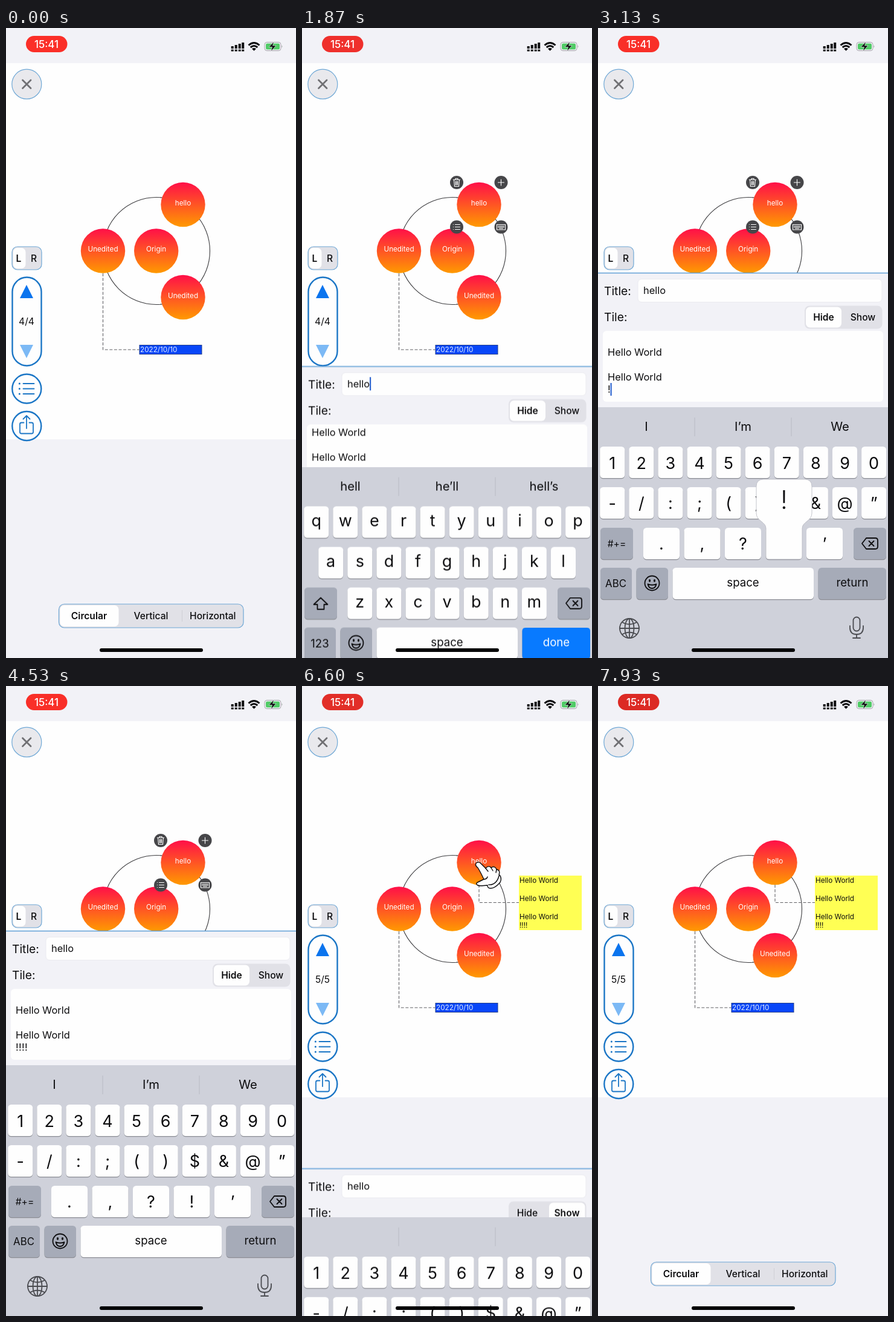
An HTML page that plays this animation: 480 px wide and 1040 px high, repeating every 8 s.

```html
<!DOCTYPE html>
<html lang="en">
<head>
<meta charset="utf-8">
<title>Circular tree editor</title>
<style>
html, body { margin: 0; width: 100%; height: 100%; overflow: hidden; background: #f2f2f7; }
svg { display: block; width: 100vw; height: 100vh; font-family: Inter, Roboto, sans-serif; }
text { fill: #0c0c0e; font-size: 15.6px; }
.mid { text-anchor: middle; }
.med { font-weight: 500; }
.bold { font-weight: 600; }
.small { font-size: 11.7px; }
.node { font-size: 11.7px; fill: #fff; text-anchor: middle; }
.body { font-size: 16.4px; }
.head { font-size: 19.3px; }
.hint { font-size: 20.2px; text-anchor: middle; }
.wide { font-size: 18.6px; text-anchor: middle; }
.key { font-size: 27px; text-anchor: middle; }
.base { fill: #f2f2f7; }
.white { fill: #fefefe; }
.track { fill: #e1e1e7; }
.edge { stroke: #6fa8d6; stroke-width: 1.2; }
.ring { fill: #fefefe; stroke: #1b76c6; stroke-width: 2.4; }
.line { fill: none; stroke: #1b76c6; stroke-width: 1.8; stroke-linecap: round; stroke-linejoin: round; }
.icon { fill: none; stroke: #0c0c0e; stroke-width: 1.8; stroke-linecap: round; stroke-linejoin: round; }
.soft { fill: none; stroke: #4a4b50; stroke-width: 1.8; stroke-linecap: round; }
.dash { fill: none; stroke: #626266; stroke-width: 1.1; stroke-dasharray: 5 2.6; }
.tool circle { fill: #464649; }
.tool path { fill: none; stroke: #fff; stroke-width: 1.1; stroke-linecap: round; }
.caret { fill: #2f66d0; }
.move { animation: 8s infinite; }
#panel { --drop: 648px; animation-name: slide; }
#board { --drop: 414px; animation-name: slide; }
#pill { animation-name: pulse; }
#lines { animation-name: scroll; }
#hand { animation-name: point; }
@keyframes slide {
  0%, 21.425% { transform: translateY(var(--drop)); animation-timing-function: cubic-bezier(.38,.7,.125,1); }
  27.675%, 80.975% { transform: none; animation-timing-function: cubic-bezier(.38,.7,.125,1); }
  87.225%, 100% { transform: translateY(var(--drop)); }
}
@keyframes pulse {
  0% { fill: #fb2f28; } 27% { fill: #ef302c; } 39%, 57% { fill: #f92f28; } 82% { fill: #e22e28; } 100% { fill: #dc2a24; }
}
@keyframes scroll {
  0%, 32.5% { transform: none; }
  34%, 100% { transform: translateY(-19px); }
}
@keyframes point {
  0%, 10.5% { transform: translate(287px, 291px); }
  15.5% { transform: translate(328px, 324px); }
  40% { transform: translate(328px, 324px); animation-timing-function: steps(1); }
  60% { transform: translate(438px, 478px); animation-timing-function: steps(1); }
  75%, 100% { transform: translate(287px, 291px); }
}
</style>
</head>
<body>
<svg viewBox="0 0 480 1040" preserveAspectRatio="none">
  <defs>
    <linearGradient id="fire" x2="0" y2="1">
      <stop stop-color="#ff0f48"/><stop offset="1" stop-color="#ff9a00"/>
    </linearGradient>
    <clipPath id="view"><rect x="8" y="501" width="464" height="116" rx="6"/></clipPath>
  </defs>

  <rect class="base" width="480" height="1040"/>
  <rect class="white" y="58" width="480" height="621"/>

  <!-- status bar -->
  <rect id="pill" class="move" x="33" y="13" width="68.5" height="27" rx="13.5"/>
  <text class="mid med" x="67" y="33" style="fill:#fff;font-size:17px">15:41</text>
  <path d="M374.7 30v4M380.7 28v6M386.7 26v8M392.2 24v10M374.7 35.5v3M380.7 35.5v3M386.7 35.5v3M392.2 35.5v3" stroke="#0c0c0e" stroke-width="4"/>
  <g fill="none" stroke="#0c0c0e" stroke-width="3">
    <path d="M401.5 28.5q9-8 18 0M404.7 32q5.8-5 11.6 0"/>
  </g>
  <path d="M407 34.3q3.5-2.6 7 0l-3.5 3.5z" fill="#0c0c0e"/>
  <rect x="428" y="23.5" width="27" height="14" rx="4" fill="none" stroke="#a2a2a6"/>
  <rect x="430" y="25.5" width="23" height="10" rx="2.5" fill="#50cb66"/>
  <path d="M456.5 28.5q2 2 0 4z" fill="#a2a2a6"/>
  <path d="M443.5 22.5l-8.5 9h5.5l-2 7 8.5-9.5h-5.5z" fill="#0c0c0e" stroke="#f2f2f7" stroke-width=".6"/>

  <!-- tree -->
  <circle cx="249" cy="368" r="88.5" fill="none" stroke="#3c3c3f" stroke-width="1.1"/>
  <path class="dash" d="M160.5 405v126h60"/>
  <rect x="221" y="523.5" width="103" height="15" fill="#0846f8" stroke="#24408c"/>
  <text class="small" x="222" y="535.3" style="fill:#e6eeff">2022/10/10</text>
  <g data-on="5300-8000">
    <path class="dash" d="M293 328v29.5h66"/>
    <rect x="359" y="313" width="104" height="90" fill="#ffff54"/>
    <text class="small" x="360" y="325">Hello World</text>
    <text class="small" x="360" y="355">Hello World</text>
    <text class="small" x="360" y="384.5">Hello World</text>
    <text class="small" x="360" y="399.3">!!!!</text>
  </g>
  <g id="nodes"></g>
  <g class="tool" data-on="700-6450">
    <circle cx="256" cy="255" r="11"/><circle cx="329.5" cy="255" r="11"/>
    <circle cx="256" cy="328.5" r="11"/><circle cx="329.5" cy="328.5" r="11"/>
    <path d="M250.5 250.5h11M254 250.5v-2h4v2M251.5 250.5l1 11h7l1-11M254.3 253v6M256 253v6M257.7 253v6"/>
    <path d="M324.5 255h10M329.5 250v10"/>
    <path d="M250.5 324.5h.1M250.5 328.5h.1M250.5 332.5h.1M253.5 324.5h8M253.5 328.5h8M253.5 332.5h8"/>
    <path d="M322.5 324.5h14v8.5h-14zM324.5 327h10M324.5 329h10M326.5 331h6"/>
  </g>

  <!-- side controls -->
  <circle class="edge" cx="34.3" cy="92.7" r="24.5" fill="#e9e9ed"/>
  <path d="M27.5 86l13.5 13.5M41 86l-13.5 13.5" stroke="#707074" stroke-width="2.8" stroke-linecap="round"/>
  <rect class="track edge" x="10" y="361" width="49" height="38" rx="9"/>
  <rect class="white" x="12" y="363" width="20.5" height="34" rx="7"/>
  <text class="mid bold" x="21" y="385.7">L</text>
  <text class="mid med" x="46" y="385.7">R</text>
  <rect class="ring" x="10.5" y="411.5" width="48" height="146" rx="24"/>
  <path d="M34 424l11 22h-22z" fill="#0b74ee"/>
  <path d="M34 545l11-22h-22z" fill="#7cb9f5"/>
  <text class="mid" x="34" y="490.3" data-on="0-5300">4/4</text>
  <text class="mid" x="34" y="490.3" data-on="5300-8000">5/5</text>
  <circle class="ring" cx="34.3" cy="595.5" r="24"/>
  <path class="line" d="M28.5 587h18M28.5 595.5h18M28.5 604h18"/>
  <path class="line" d="M22.3 587h.1M22.3 595.5h.1M22.3 604h.1" style="stroke-width:3"/>
  <circle class="ring" cx="34.3" cy="657" r="24"/>
  <path class="line" d="M29.5 651.5h-4q-2.5 0-2.5 2.5v13q0 2.5 2.5 2.5h17q2.5 0 2.5-2.5v-13q0-2.5-2.5-2.5h-4M34 661v-20.5M28.5 645.5l5.5-5.5 5.5 5.5"/>

  <!-- layout switch -->
  <rect class="track edge" x="87.5" y="951" width="305.5" height="39" rx="9"/>
  <rect class="white" x="89.5" y="953" width="97" height="35" rx="7"/>
  <path d="M291.5 961v19" stroke="#cfcfd6"/>
  <text class="mid bold" x="137.5" y="975.8">Circular</text>
  <text class="mid med" x="240" y="975.8">Vertical</text>
  <text class="mid med" x="342.3" y="975.8">Horizontal</text>

  <g id="panel" class="move">
    <rect class="base" y="404" width="480" height="660"/>
    <path d="M0 404.5h480" stroke="#5f9fd6" stroke-width="1.3"/>
    <text class="head" x="10" y="440.5">Title:</text>
    <rect class="white" x="66" y="414.5" width="404" height="38" rx="6" stroke="#ebebf0"/>
    <text class="body" x="75" y="439">hello</text>
    <rect class="caret" x="112" y="422" width="2.2" height="22" data-on="1700-2400"/>
    <text class="head" x="10" y="484">Tile:</text>
    <rect class="track" x="342" y="458.5" width="128.5" height="38" rx="8"/>
    <g data-on="0-5300">
      <rect class="white" x="344" y="460.5" width="59" height="34" rx="7"/>
      <text class="mid bold" x="373.5" y="483">Hide</text>
      <text class="mid med" x="438.5" y="483">Show</text>
    </g>
    <g data-on="5300-8000">
      <rect class="white" x="409" y="460.5" width="59.5" height="34" rx="7"/>
      <text class="mid med" x="373" y="483">Hide</text>
      <text class="mid bold" x="438.5" y="483">Show</text>
    </g>
    <rect class="white" x="8" y="500" width="464" height="117" rx="6"/>
    <g clip-path="url(#view)">
      <g id="lines" class="move">
        <text class="body" x="16" y="519">Hello World</text>
        <text class="body" x="16" y="560">Hello World</text>
        <text class="body" x="16" y="601">Hello World</text>
        <rect class="caret" x="107.5" y="584" width="2.2" height="21" data-on="2400-2600"/>
      </g>
    </g>
  </g>

  <g id="board" class="move">
    <rect y="626" width="480" height="434" fill="#cfd1da"/>
    <path d="M160 643v31M320 643v31" stroke="#b8bac4"/>
    <g data-on="0-2620">
      <text class="hint" x="80" y="665">hell</text><text class="hint" x="240" y="665">he’ll</text><text class="hint" x="400.5" y="665">hell’s</text>
    </g>
    <g data-on="2620-6560">
      <text class="hint" x="80" y="665">I</text><text class="hint" x="240" y="665">I’m</text><text class="hint" x="400.5" y="665">We</text>
    </g>
    <g id="common"></g>
    <g id="letters" data-on="0-2850"></g>
    <g id="numbers" data-on="2850-8000"></g>
    <path class="icon" d="M437 851l7-9h15q4 0 4 4v10q0 4-4 4h-15zM448.5 847l8 8M456.5 847l-8 8"/>
    <circle class="icon" cx="89.5" cy="916.5" r="12"/>
    <path class="icon" d="M82.5 918q7 3 14 0q-1.5 7-7 7t-7-7z"/>
    <path class="icon" d="M85.5 911.5v1.5M93.5 911.5v1.5" style="stroke-width:3"/>
    <g class="soft">
      <circle cx="52" cy="991" r="16"/><ellipse cx="52" cy="991" rx="7.5" ry="16"/>
      <path d="M52 975v32M36 991h32M40 981q12 7 24 0M40 1001q12-7 24 0"/>
      <rect x="422.5" y="972.5" width="11" height="23" rx="5.5"/>
      <path d="M417 987v3q0 11 11 11t11-11v-3M428 1001v6M422 1007h12"/>
    </g>
    <g id="popup">
      <path class="white" d="M274 745h68q12 0 12 12v44c0 13-16 14-16 25v46q0 5-5 5h-50q-5 0-5-5v-46c0-11-16-12-16-25v-44q0-12 12-12z" stroke="#b6b8c0" stroke-width=".8"/>
      <text class="mid" x="308" y="794" style="font-size:42px;font-weight:300">!</text>
    </g>
  </g>

  <rect x="155" y="1024" width="171" height="6" rx="3" fill="#050506"/>

  <g id="hand" class="move" stroke="#0c0c0e" stroke-width="1.4" stroke-linejoin="round" stroke-linecap="round">
    <g data-on="430-1660 5000-5560 6250-7000">
      <path class="white" d="M1 2C3-2 8 0 10 3L17 10C20 6 24 6 26 9C30 6 34 8 35 12C39 12 41 16 39 20C43 24 43 29 41 33C36 39 30 43 25 43C22 43 20 41 20 38C14 38 8 40 4 38C0 36 2 33 6 32L14 28C12 24 9 17 4 9C1 7 0 4 1 2z"/>
      <path fill="none" d="M22 37c8 1 15-5 17-15M17 10l4 5M26 9l3 5M35 12l-1 5M14 28q5 0 6-4"/>
    </g>
  </g>
</svg>

<script>
const LOOP = 8000;
const $ = id => document.getElementById(id);
const put = (id, html) => $(id).insertAdjacentHTML('beforeend', html);

const node = (x, y, name) =>
  `<circle cx="${x}" cy="${y}" r="36.7" fill="url(#fire)"/><text class="node" x="${x}" y="${y + 1.4}">${name}</text>`;
put('nodes', node(293, 291.5, 'hello') + node(160.5, 368, 'Unedited') +
  node(248.7, 368, 'Origin') + node(293, 444.5, 'Unedited'));

// Keyboard
const WHITE = '#fefefe', GRAY = '#a6abb8', BLUE = '#087aff';
const cap = (x, y, w, fill = WHITE) =>
  `<rect x="${x}" y="${y + 1.3}" width="${w}" height="52" rx="5.5" fill="#8b8d94"/>` +
  `<rect x="${x}" y="${y}" width="${w}" height="52" rx="5.5" fill="${fill}"/>`;
const label = (x, y, s, cls = 'key', style = '') => `<text class="${cls}" x="${x}" y="${y}" style="${style}">${s}</text>`;
const row = (chars, x, y, base, step = 48.1, w = 41) => [...chars].map((c, i) =>
  cap(x + step * i - w / 2, y, w) + label(x + step * i, y + base, c.replace('&', '&amp;'))).join('');

put('common',
  cap(4, 825, 54, GRAY) + cap(423, 825, 54, GRAY) + cap(4, 891, 52, GRAY) + cap(63.5, 891, 52.5, GRAY) +
  cap(123.5, 891, 233.5) + label(240, 922, 'space', 'wide') +
  `<g data-on="0-2400">${cap(364.5, 891, 112.5, BLUE)}${label(421, 922, 'done', 'wide', 'fill:#fff')}</g>` +
  `<g data-on="2400-8000">${cap(364.5, 891, 112.5, GRAY)}${label(421, 922, 'return', 'wide')}</g>`);
put('letters',
  row('qwertyuiop', 23.7, 691, 33) + row('asdfghjkl', 47.7, 758, 33) + row('zxcvbnm', 95.8, 825, 33) +
  '<path class="icon" d="M31 842l11.5 11h-6v8h-11v-8h-6z"/>' + label(29.5, 924, '123', 'wide'));
put('numbers',
  row('1234567890', 23.7, 691, 36.5) + row('-/:;()$&@”', 23.7, 758, 35.5) + row('.,?!’', 105, 825, 36, 67.5, 60) +
  label(31, 857, '#+=', 'mid') + label(29.5, 923, 'ABC', 'mid', 'font-size:16.8px'));

// Typed marks, each followed by the caret until the next one
const typed = [3080, 3340, 3580, 3820];
put('panel', `<rect class="caret" x="16" y="586" width="2.2" height="21" data-on="2620-3080"/>` +
  typed.map((t, i) => `<text class="body" x="${16 + 5 * i}" y="602" data-on="${t}-8000">!</text>` +
    `<rect class="caret" x="${20.5 + 5 * i}" y="586" width="2.2" height="21" data-on="${t}-${typed[i + 1] || 4330}"/>`).join(''));
$('popup').dataset.on = typed.map(t => `${t - 20}-${t + 120}`).join(' ');

// Show an element only during its listed time spans
const step = (t, opacity) => ({ offset: t / LOOP, opacity, easing: 'steps(1)' });
for (const el of document.querySelectorAll('[data-on]')) {
  const frames = el.dataset.on.split(' ').flatMap(span => span.split('-').map((t, i) => step(t, 1 - i)));
  if (frames[0].offset > 0) frames.unshift(step(0, 0));
  if (frames.at(-1).offset < 1) frames.push(step(LOOP, 0));
  el.animate(frames, { duration: LOOP, iterations: Infinity });
}
</script>
</body>
</html>
```
